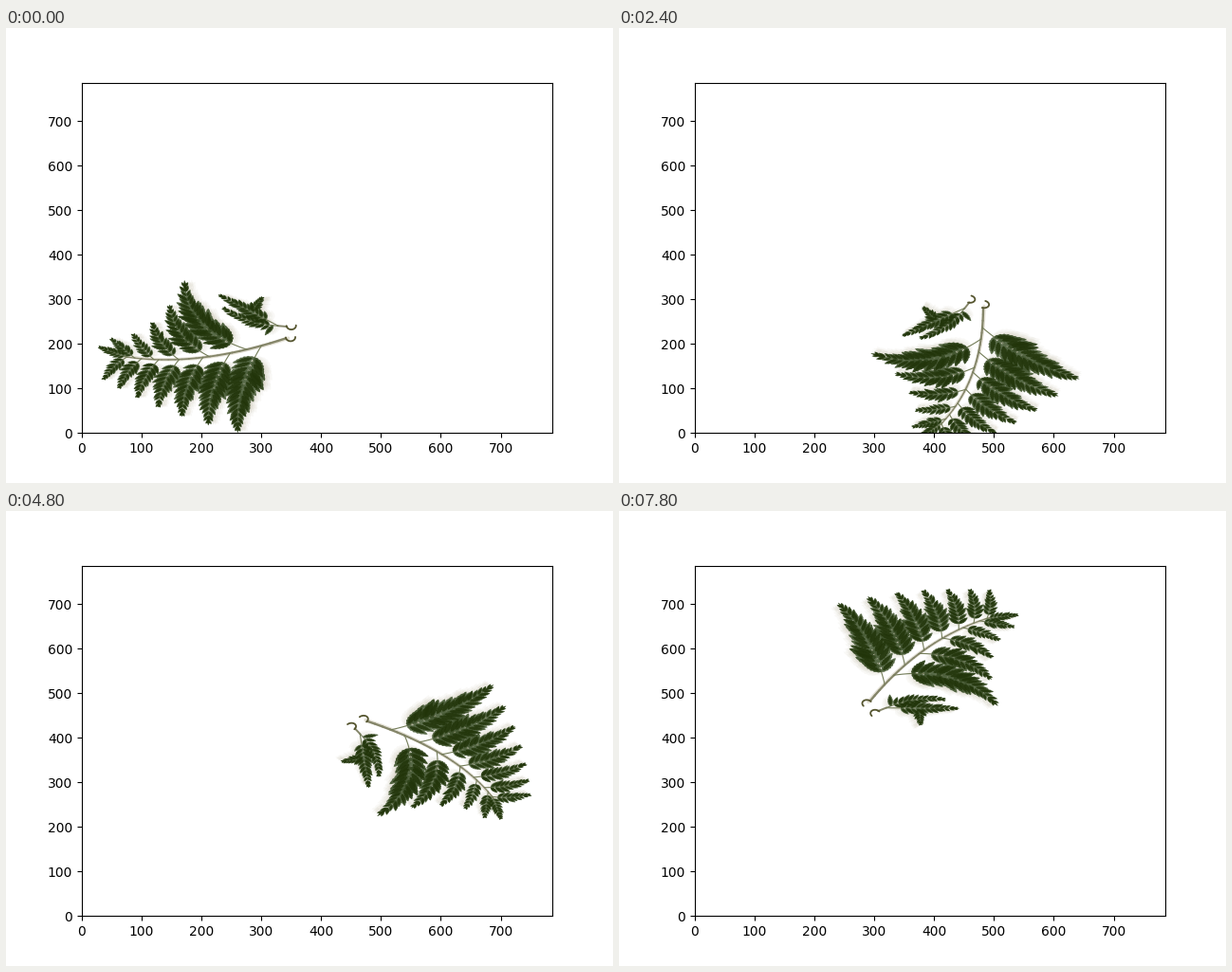
Recreate the animation shown at these times as a matplotlib script. Size 640 by 480 pixels, loop 8000 ms.

```python
import numpy as np
import matplotlib.pyplot as plt
from matplotlib.animation import FuncAnimation
from matplotlib.collections import LineCollection, PolyCollection
from matplotlib.transforms import Affine2D

SIZE = 786.3
PIVOT = (359, 355)
STEP = 5.5          # degrees per frame
REST = 32           # frame at which the coordinates below hold
FRAMES, INTERVAL = 40, 200

rng = np.random.default_rng(4)


def bezier(a, mid, b, t):
    """Quadratic curve that passes through mid at t = 0.5."""
    a, mid, b = (np.array(p, float) for p in (a, mid, b))
    c = 2 * mid - (a + b) / 2
    t = np.asarray(t, float)[:, None]
    return (1 - t) ** 2 * a + 2 * t * (1 - t) * c + t ** 2 * b


def ease(u, pull=0.35):
    return u + pull * u * (1 - u)


def stem_at(t):
    return bezier((387, 496), (540, 530), (672, 514), t)


def leaflet(root, angle, length, width):
    """Lance-shaped blade with toothed edges."""
    u = np.linspace(0, 1, 13)
    teeth = np.where(np.arange(13) % 2, 1.0, 0.8)
    half = width * np.sin(np.pi * u ** 0.8) ** 0.8 * teeth
    xs = np.r_[u, u[::-1]] * length
    ys = np.r_[half, -half[::-1]]
    c, s = np.cos(angle), np.sin(angle)
    return np.c_[root[0] + c * xs - s * ys, root[1] + s * xs + c * ys]


blades, cores, tints, ribs = [], [], [], []


def add_leaflet(root, angle, length, width):
    blades.append(leaflet(root, angle, length, width))
    inner = root + 0.12 * length * np.array([np.cos(angle), np.sin(angle)])
    cores.append(leaflet(inner, angle, 0.72 * length, 0.6 * width))
    mix = rng.uniform()
    tints.append((np.array([48, 68, 28]) * (1 - mix)
                  + np.array([92, 110, 76]) * mix) / 255)


def add_pinna(base, tip, bow=0.0, spread=0.3, start=0.14):
    """Feather-shaped branch; bow bends it to the left of its direction."""
    base, tip = np.array(base, float), np.array(tip, float)
    dx, dy = tip - base
    size = np.hypot(dx, dy)
    mid = (base + tip) / 2 + bow * np.array([-dy, dx])
    ribs.append(bezier(base, mid, tip, np.linspace(0, 0.95, 30)))
    stops = np.linspace(start, 0.93, int(5 + size / 17))
    roots = bezier(base, mid, tip, stops)
    ahead = bezier(base, mid, tip, stops + 0.02)
    for t, root, nxt in zip(stops, roots, ahead):
        heading = np.arctan2(*(nxt - root)[::-1])
        rise = min(1, 0.4 + 2 * t)
        length = spread * size * rise * (1 - t) ** 0.75 + 4
        for side in (-1, 1):
            lean = np.radians(50 - 26 * t + rng.uniform(-5, 5))
            reach = length * rng.uniform(0.85, 1.1)
            add_leaflet(root, heading + side * lean, reach, 0.17 * reach + 1)
    dx, dy = tip - roots[-2]
    add_leaflet(roots[-2], np.arctan2(dy, dx), np.hypot(dx, dy), 3)


def add_fan(bases, tips, bows):
    for base, tip, bow in zip(stem_at(bases), tips, bows):
        add_pinna(base, tip, bow)


u = np.linspace(0, 1, 7)
add_fan(0.13 + 0.8 * ease(u),
        bezier((482, 702), (592, 648), (697, 567), ease(u)), -0.06 + 0 * u)
u = np.linspace(0, 1, 5)
add_fan(0.21 + 0.67 * ease(u),
        bezier((547, 354), (607, 445), (678, 477), u), 0.16 * (1 - u))
add_pinna((653, 520), (700, 494))

# the loose sprig below the stem
add_pinna((398, 467), (488, 419), bow=0.09, spread=0.22)
add_pinna((398, 467), (493, 390), spread=0.22, start=0.2)
add_pinna((442, 434), (420, 402), spread=0.36)
add_leaflet(np.array([406, 465]), 0.96, 27, 5)

fig, ax = plt.subplots(figsize=(6.4, 4.8), dpi=100)
ax.set_xlim(0, SIZE)
ax.set_ylim(0, SIZE)

spin = Affine2D()


def add(artist, z):
    artist.set_transform(spin + ax.transData)
    artist.set_zorder(z)
    ax.add_collection(artist, autolim=False)


def lines(paths, color, width, z):
    add(LineCollection(paths, colors=color, linewidths=width,
                       capstyle="round"), z)


for shift in (4, 8, 12):
    add(PolyCollection([p - (shift, 0) for p in blades],
                       facecolors="#b8b094", alpha=0.08, linewidths=0), 1.0)

stem = stem_at(np.linspace(0, 1, 25))
lines([stem - (4, 0)], "#e4e1d6", 2.6, 1.1)
pieces = np.stack([stem[:-1], stem[1:]], axis=1)
lines(pieces, "#85866a", np.linspace(1.7, 0.8, len(pieces)), 1.2)
lines([((383, 470), (399, 467))], "#85866a", 1.4, 1.2)
lines(ribs, "#737c58", 0.8, 1.3)
add(PolyCollection(blades, facecolors=tints, linewidths=0), 1.4)
add(PolyCollection(cores, facecolors="#213409", alpha=0.85, linewidths=0), 1.5)

arc = np.linspace(0, np.pi, 16)
hook = np.c_[8 * np.cos(arc), 9 * np.sin(arc)]
lines([hook + (379, 494), hook + (376, 468)], "#55552f", 1.3, 1.6)


def draw(i):
    spin.clear().rotate_deg_around(*PIVOT, (i - REST) * STEP)
    return []


anim = FuncAnimation(fig, draw, frames=FRAMES, interval=INTERVAL,
                     init_func=lambda: draw(0), repeat=True, repeat_delay=0)
plt.show()
```
